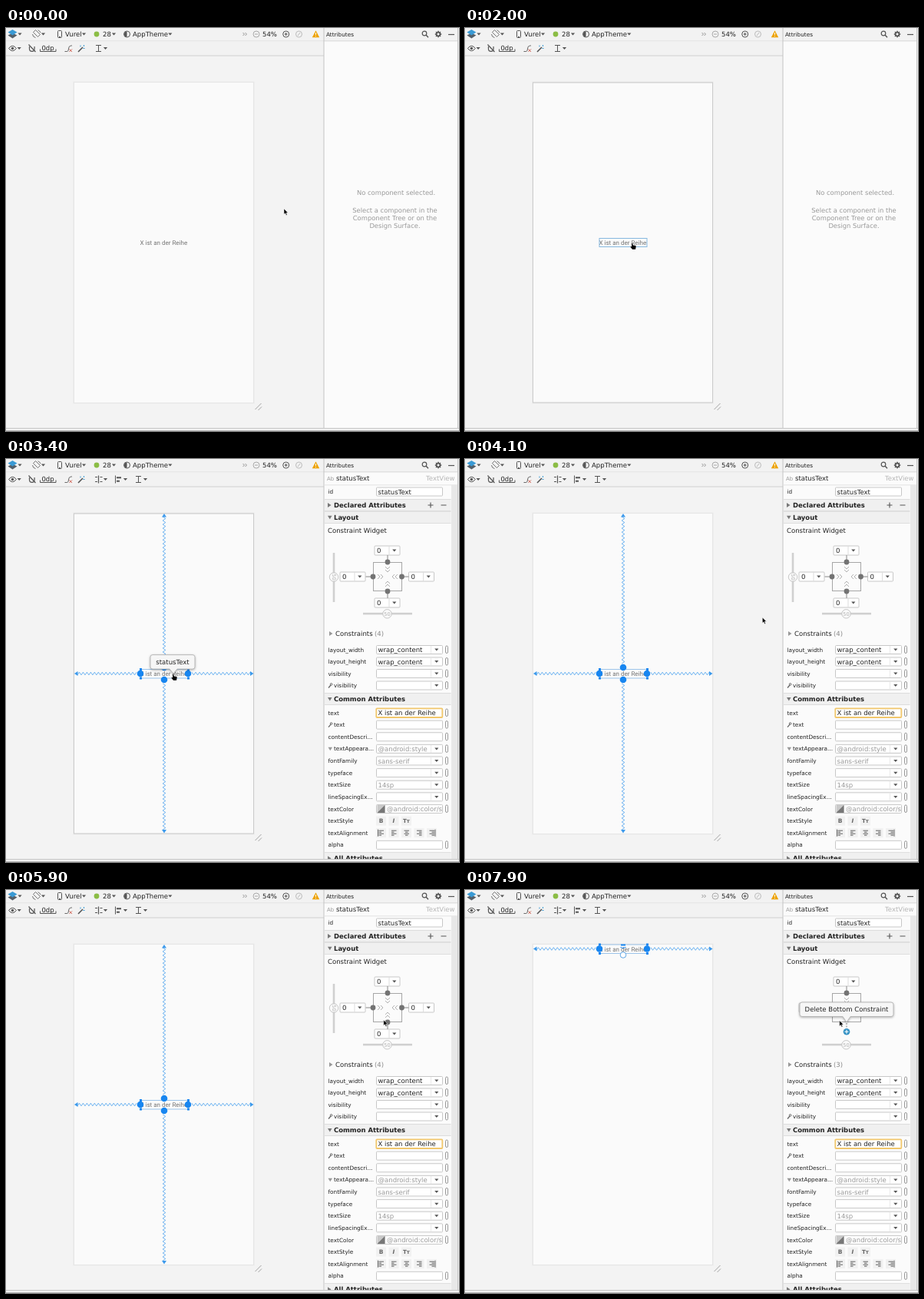
An HTML page for the animation above (8000 ms loop, 590 by 524 pixels).

```html
<!DOCTYPE html>
<html lang="en">
<head>
<meta charset="utf-8">
<title>Layout editor</title>
<style>
html, body { margin: 0; width: 590px; height: 524px; overflow: hidden; background: #f3f3f3; }
svg { display: block; font-family: "DejaVu Sans", sans-serif; text-rendering: geometricPrecision; }
text { white-space: pre; }
.bubble { filter: drop-shadow(0 1px 1.5px rgba(0, 0, 0, .3)); }
</style>
</head>
<body>
<svg id="stage" width="590" height="524" viewBox="0 0 590 524"></svg>
<script>
const BLUE = '#1886f0', INK = '#222', GREY = '#999', EDGE = '#c8c8c8';
const SIZE = 8.53, SMALL = 7.3;

// Drawing helpers: each returns SVG markup.
const rect = (x, y, w, h, fill, stroke, r = 0) => stroke
  ? `<rect x="${x + .5}" y="${y + .5}" width="${w - 1}" height="${h - 1}" rx="${r}" fill="${fill}" stroke="${stroke}"/>`
  : `<rect x="${x}" y="${y}" width="${w}" height="${h}" rx="${r}" fill="${fill}"/>`;
const path = (d, stroke = '#555', w = 1, fill = 'none') =>
  `<path d="${d}" stroke="${stroke}" stroke-width="${w}" fill="${fill}"/>`;
const solid = (d, fill = '#555') => path(d, 'none', 0, fill);
const dot = (x, y, r, fill, stroke = 'none', w = 1) =>
  `<circle cx="${x}" cy="${y}" r="${r}" fill="${fill}" stroke="${stroke}" stroke-width="${w}"/>`;
const text = (x, y, s, fill = INK, size = SIZE, more = '') =>
  `<text x="${x}" y="${y + size * .36}" font-size="${size}" fill="${fill}" ${more}>${s}</text>`;
const caret = (x, y, fill = '#555') => solid(`M${x - 2.6} ${y - 1.4}h5.2l-2.6 3z`, fill);
const group = (id, body) => `<g id="${id}">${body}</g>`;
const bold = 'font-weight="bold"';
const mid = 'text-anchor="middle"';

function toolbar() {
  return rect(0, 0, 590, 17, '#f2f2f2') + rect(0, 17, 414, 19, '#f2f2f2') +
    rect(0, 16.5, 414, .7, '#dedede') + rect(0, 35.5, 414, 1, '#d2d2d2') +
    solid('M2.5 9.5L8.5 6.5L14.5 9.5L8.5 13.5z', '#55606a') + solid('M2.5 5.5L8.5 2L14.5 5.5L8.5 9.5z', '#3a9ad4') +
    caret(18, 8) +
    path('M35.500 5.500l3-3l6 6l-3 3zM34.500 8a5 5 0 0 0 4 4.500M41.500 2.800a5 5 0 0 1 3.500 3.500', '#666', .9) + caret(48.5, 8) +
    rect(67, 3, 6, 10, 'none', '#555', 1) + rect(69, 11, 2, 1, '#555') +
    text(77, 8, 'Vurel') + caret(101.5, 8) +
    dot(118, 8, 3.4, '#8bbd45') + text(126, 8, '28') + caret(140.5, 8) +
    dot(157.5, 8, 4, 'none', '#555') + solid('M157.5 4.5a3.5 3.5 0 0 0 0 7z') +
    text(165, 8, 'AppTheme') + caret(213.8, 8) +
    path('M308.500 6l2 2l-2 2M311.500 6l2 2l-2 2', '#888', .9) +
    dot(326, 8, 4, 'none', '#aaa') + path('M324 8h4', '#aaa') +
    text(334, 8, '54%') +
    dot(364.7, 8, 4, 'none', '#555') + path('M362.700 8h4M364.700 6v4') +
    dot(381.5, 8, 4, 'none', '#bbb') + path('M380 10l3-4', '#bbb') +
    solid('M403.500 3.300L408.200 12.200H398.800z', '#eda200') + rect(403, 6, 1, 3, '#fff') + rect(403, 10, 1, 1, '#fff') +
    path('M3.500 26.500q5-6.500 10 0q-5 6.500-10 0z', '#555') + dot(8.5, 26.5, 1.7, '#555') + caret(17.2, 26.5) +
    path('M30.500 24v3a3.300 3.300 0 0 0 6.600 0v-3M29.500 21.500l9 9.500', '#555', 1.2) +
    text(54.5, 25.8, '0dp', INK, SIZE, mid) + path('M44.500 27.500v3h20.500v-3') +
    path('M76.500 30.500h3q2 0 2-3.500t3-4h1.500', '#666') + path('M82.500 27.500l3.500 3.500m0-3.500l-3.500 3.500', '#d06050') +
    path('M94 31l6-6', '#555', 1.6) + path('M97 22.500v2M101.500 22v2M102.500 26.500h-2', '#3a9ad4');
}

const ibeam = x => path(`M${x - 3.5} 22.500h7M${x - 3.5} 30.500h7M${x} 22.500v8`) + caret(x + 9, 26.5);

const alignTools =
  path('M116 23.500h3M116 29.500h3M120.500 21.500v10M122.500 23.500h3M122.500 29.500h3', '#555', 1.2) + caret(129.5, 26.5) +
  path('M142.500 21.500v10', '#555') + path('M144 24.200h6M144 28.800h4', '#555', 2) + caret(155.5, 26.5);

function panelBase() {
  const teeth = [0, 45, 90, 135].map(a =>
    `<path d="M563 3.800v8.400" stroke="#555" stroke-width="1.700" transform="rotate(${a} 563 8)"/>`).join('');
  return rect(414, 17, 175, 503, '#fbfbfb') + rect(414, 16.5, 175, .8, '#d0d0d0') +
    text(417, 8, 'Attributes', INK, SMALL) +
    dot(545, 7, 2.8, 'none', '#555', 1.2) + path('M547 9l3 3.300', '#555', 1.4) +
    teeth + dot(563, 8, 2.3, '#f2f2f2', '#555', 1.6) + path('M576 8.500h8', '#555', 1.2);
}

const emptyPanel = [['No component selected.', 214], ['Select a component in the', 237],
  ['Component Tree or on the', 247], ['Design Surface.', 257]]
  .map(([s, y]) => text(y === 214 ? 508 : 506.5, y, s, GREY, 8.4, mid)).join('');

const field = (y, stroke = EDGE) => rect(482, y - 6, 87, 12, '#fff', stroke, 1);
const combo = y => field(y) + rect(553, y - 5, 1, 10, '#e8e8e8') + caret(560.8, y);
const pill = y => rect(572, y - 5.5, 4, 10.5, '#fdfdfd', '#999', 1.5);
const wrench = y => path(`M420 ${y + 3}l3-3.500`, '#666', 1.3) + dot(423.6, y - 1.6, 1.3, 'none', '#666');
const closed = (x, y, c = '#777') => solid(`M${x} ${y - 3}l4.500 3l-4.500 3z`, c);
const opened = (x, y, c = '#777') => solid(`M${x} ${y - 2}h5.500l-2.700 4.500z`, c);
const header = (y, s, open) => rect(415, y - 7.5, 164.5, 15, '#f0f0f0') + rect(415, y - 8, 164.5, .8, '#d8d8d8') +
  rect(415, y + 7.2, 164.5, .8, '#d8d8d8') + (open ? opened : closed)(419, y) + text(427, y, s, INK, 8.46, bold);

// label, value, kind, mark
const layoutRows = [['layout_width', 'wrap_content', 'c'], ['layout_height', 'wrap_content', 'c'],
  ['visibility', '', 'c'], ['visibility', '', 'c', 'w']];
const commonRows = [['text', 'X ist an der Reihe', 't'], ['text', '', 'f', 'w'], ['contentDescri...', '', 'f'],
  ['textAppeara...', '@android:style', 'c', 'o'], ['fontFamily', 'sans-serif', 'c'], ['typeface', '', 'c'],
  ['textSize', '14sp', 'c'], ['lineSpacingEx...', '', 'c'], ['textColor', '@android:color/s', 'k'],
  ['textStyle', '', 's'], ['textAlignment', '', 'a'], ['alpha', '', 'f']];

function styleButtons(y) {
  return [488.5, 505, 521.5].map(x => rect(x - 6.5, y - 6, 13, 12, '#f1f1f1')).join('') +
    text(488.5, y, 'B', '#666', 7.5, bold + mid) + text(505, y, 'I', '#666', 7.5, bold + mid + ' font-style="italic"') +
    text(521.5, y, 'Tт', '#666', 7, bold + mid);
}

function alignButtons(y) {
  return [488.5, 505, 521.5, 538, 554.5].map((x, i) => {
    const shift = [0, 0, 1.5, 3, 3][i];
    const bars = [-3, -1, 1, 3].map((dy, k) =>
      `M${x - 3 + (k % 2 ? shift : 0)} ${y + dy}h${k % 2 ? 3.5 : 6.5}`).join('');
    const side = i === 0 ? `M${x - 4} ${y - 4.5}v9` : i === 4 ? `M${x + 4.5} ${y - 4.5}v9` : '';
    return rect(x - 6.5, y - 6, 13, 12, '#f1f1f1') + path(bars + side, '#555', .9);
  }).join('');
}

function row([label, value, kind, mark], y, labelY, i) {
  const grey = i >= 0 && kind !== 't';
  let out = text(mark ? 427 : 419.5, labelY, label, INK, SMALL);
  if (mark === 'w') out += wrench(labelY);
  if (mark === 'o') out += opened(419.5, labelY, '#999');
  if (kind === 's') return out + styleButtons(y);
  if (kind === 'a') return out + alignButtons(y);
  out += kind === 'c' ? combo(y) : field(y);
  if (kind === 't') out += `<rect x="482.300" y="${y - 5.7}" width="86" height="11.700" rx="1" fill="#fff" stroke="#f1c76c" stroke-width="1.800"/>`;
  if (kind === 'k') out += rect(483.5, y - 5, 10, 10, '#c9c9c9') + solid(`M493.500 ${y - 5}v10h-10z`, '#777');
  const x = kind === 'k' ? 496 : 484.5;
  const clip = kind === 'c' ? 'clip-path="url(#comboClip)"' : 'clip-path="url(#fieldClip)"';
  return out + text(x, y, value, grey ? GREY : INK, SIZE, clip) + pill(y);
}

// Rows sit slightly differently until the panel has been laid out.
function rows(early) {
  const lift = early ? 3 : 0;
  return text(419.5, early ? 40 : 42.5, 'id', INK, SMALL) +
    layoutRows.map((r, i) => row(r, 248 + i * 15.5, 248 + i * 15.5 - lift, -1)).join('') +
    commonRows.map((r, i) => {
      const y = 330 + i * (early ? 15.77 : 15.62);
      return row(r, y, y - (early ? 3.2 : 0), i);
    }).join('') + header(early ? 521 : 519.3, 'All Attributes', false);
}

const panelTop = text(418, 25, 'Ab', GREY, 7) + text(430, 25, 'statusText') +
  text(584.5, 25, 'TextView', '#b5b5b5', SIZE, 'text-anchor="end"') + rect(415, 33.5, 173, .8, '#dcdcdc') +
  rect(580, 34, 8, 486, '#e8e8e8') +
  field(42.5) + text(484.5, 42.5, 'statusText') +
  header(60, 'Declared Attributes') + path('M549.500 60h7M553 56.500v7M566.500 60h7', '#555', 1.1) +
  header(75.8, 'Layout', true) + text(419, 92.5, 'Constraint Widget') +
  closed(421, 227, '#999') + text(429, 227, 'Constraints') + header(312, 'Common Attributes', true);

const margin = (x, y) => rect(x, y - 6.5, 34, 13, '#fff', EDGE, 1) + rect(x + 19, y - 6, 1, 12, '#ddd') +
  text(x + 3.5, y, '0') + caret(x + 26.3, y);
const knob = (x, y, turn = 0) => dot(x, y, 5.7, '#fbfbfb', '#c4c4c4') +
  text(x, y, '50', '#b0b0b0', 6.6, `${mid} transform="rotate(${turn} ${x} ${y})"`);
const chevrons = turn => `<g transform="rotate(${turn} 497 153)">` +
  path('M484 150l3 3l-3 3M488 150l3 3l-3 3', '#aaa', .9) + '</g>';
const joint = (x, y) => dot(x, y, 3.4, '#737373');

const widget = margin(479.5, 119) + margin(434.5, 153) + margin(524, 153) +
  path('M497 125v9M468.500 153h10M515.500 153h9', '#888') + rect(478, 134, 38, 38, '#fbfbfb', '#a6a6a6') +
  chevrons(0) + chevrons(90) + chevrons(180) + joint(497, 134) + joint(478, 153) + joint(515.5, 153) +
  rect(465, 199.8, 64, 2.6, '#d0d0d0') + knob(496.5, 201.3);
const widgetBottom = margin(479.5, 187) + path('M497 172v9', '#888') + chevrons(270) + joint(497, 172) +
  rect(425.7, 122, 2.6, 64, '#d0d0d0') + knob(427, 153.5, 90);
const widgetOpen = path('M497 166v13', '#888').replace('/>', ' stroke-dasharray="2 1.500"/>') +
  dot(497, 184.3, 4.3, '#3592c4') + path('M494.500 184.300h5M497 181.800v5', '#fff', 1.1);

// A zigzag spring along one axis, ending at `to`.
function spring(from, to, at, upright) {
  const n = Math.round(Math.abs(to - from) / 2.5);
  const pts = Array.from({ length: n + 1 }, (_, i) => {
    const a = (from + (to - from) * i / n).toFixed(2), b = at + (i % 2 ? 1.8 : -1.8);
    return upright ? `${b} ${a}` : `${a} ${b}`;
  });
  return path('M' + pts.join('L'), 'currentColor', .75);
}

function arrow(x, y, turn) {
  return `<path d="M0 0l4.500-3v6z" fill="currentColor" transform="translate(${x} ${y}) rotate(${turn})"/>`;
}

const sideSprings = y => spring(170, 93, y, false) + spring(242, 318, y, false) + arrow(89, y, 0) + arrow(322.5, y, 180);
const phrase = y => text(174.5, y, 'X ist an der Reihe', '#757575', 8, 'font-family="Roboto, sans-serif"');
const handle = (x, y) => dot(x, y, 4.3, BLUE);

function selection(y) {
  const corners = [174, 236].map(x => [y - 7, y + 4.5].map(cy => rect(x, cy, 3, 3, BLUE)).join('')).join('');
  return path(`M175.500 ${y - 5.5}h62M175.500 ${y + 6}h62`, '#84b7e6', .8) + corners +
    handle(175, y) + handle(237, y);
}

function bubble(x, y, w, tipX, tipY, s) {
  const b = y + 18.5;
  const d = `M${x + 3} ${y}H${x + w - 3}q3 0 3 3V${b - 3}q0 3-3 3H${tipX + 5}L${tipX} ${tipY}L${tipX - 5} ${b}H${x + 3}q-3 0-3-3V${y + 3}q0-3 3-3z`;
  return `<g class="bubble">${path(d, '#b4b4b4', .9, '#f6f6f6')}</g>` + text(x + w / 2, y + 9, s, INK, SIZE, mid);
}

const stage = document.getElementById('stage');
stage.innerHTML =
  '<defs><clipPath id="comboClip"><rect x="482" y="0" width="67.500" height="524"/></clipPath>' +
  '<clipPath id="fieldClip"><rect x="482" y="0" width="86" height="524"/></clipPath></defs>' +
  rect(0, 0, 590, 524, '#f3f3f3') + toolbar() + group('plainTools', ibeam(120.5)) +
  group('pickedTools', alignTools + ibeam(172.5)) +
  rect(87, 69.5, 237, 419, '#eee') + rect(88, 70, 235, 418, '#fafafa', '#e6e6e6') +
  group('rim', rect(88, 70.5, 235, 417, '#fafafa', '#cbcbcb')) +
  path('M324.500 496l8-8M328.500 497l4.500-4.500', '#999', .9) +
  group('textMid', phrase(279.3)) + group('hoverBox', rect(174.5, 273, 63, 12, 'none', '#86b8df')) +
  group('springs', group('sides', sideSprings(279)) +
    group('tall', spring(266, 75, 206, true) + spring(292, 482, 206, true) + arrow(206, 486.5, 270)) +
    group('straight', path('M206 266V74', 'currentColor')) + arrow(206, 71, 90)) +
  group('pickMid', selection(279) + handle(206, 271) + group('lowFull', handle(206, 287)) +
    group('lowOpen', dot(206, 287, 3.8, '#fff', '#5fa5e4'))) +
  group('pickTop', phrase(77) + `<g color="#3d9aec">${sideSprings(76.5)}</g>` + selection(76.5) +
    path('M203 71.500h6', BLUE, 2) + path('M202.500 74.500q3.500 2 7 0', BLUE) + dot(206, 84.5, 3.8, '#fff', '#5fa5e4')) +
  panelBase() + group('empty', emptyPanel) +
  group('panel', panelTop + group('early', rows(true)) + group('settled', rows(false)) +
    group('four', text(480, 227, '(4)', '#888')) + group('three', text(480, 227, '(3)', '#888')) +
    widget + group('linked', widgetBottom) + group('unlinked', widgetOpen)) +
  rect(413.5, 0, 1, 520, '#c4c4c4') + rect(588, 0, 1, 520, '#c4c4c4') + rect(589, 0, 1, 524, '#f2f2f2') +
  rect(0, 520, 590, 4, '#f2f2f2') + rect(0, 520, 590, 1, '#c6c6c6') + rect(0, 523, 590, 1, '#b8b8b8') +
  group('nameTip', bubble(188, 254.6, 58, 218, 279, 'statusText')) +
  group('deleteTip', bubble(436, 146, 122, 497, 172, 'Delete Bottom Constraint')) +
  group('cursor', group('pointer', path('M0 0v7.300l1.700-1.500l1.200 2.700l1.300-.6l-1.200-2.600h2.300z', '#fff', .5, '#000')) +
    group('hand', path('M-1.200 0q1-.8 1.700 0l.5 2.300l3 .4q1 .5.9 2l-.8 3.300h-4.200l-2.600-3.300q-.2-1.200 1.700-.7z', '#fff', .4, '#000')));

const el = {};
stage.querySelectorAll('g[id]').forEach(g => el[g.id] = g);
const show = (id, on) => { el[id].style.display = on ? '' : 'none'; };

// time, x, y
const route = [[0, 362, 235], [400, 362, 235], [1000, 297, 258], [1200, 297, 258], [2000, 218, 280], [3400, 218, 280],
  [4100, 387.3, 206], [4400, 387.3, 206], [5300, 483.5, 169.5], [5600, 490.7, 169], [5800, 490.7, 169],
  [5900, 491.8, 169], [6400, 495.5, 171], [7800, 495.5, 171], [7900, 487.7, 169.7], [8000, 487.7, 169.7]];

const ramp = (t, a, b) => Math.min(1, Math.max(0, (t - a) / (b - a)));
const ease = k => (1 - Math.cos(Math.PI * k)) / 2;

function place(t) {
  const i = Math.max(1, route.findIndex(p => t <= p[0]));
  const [a, x, y] = route[i - 1], [b, x2, y2] = route[i];
  const k = ease(ramp(t, a, b));
  return [x + (x2 - x) * k, y + (y2 - y) * k];
}

const mix = (a, b, k) => `rgb(${a.map((v, i) => Math.round(v + (b[i] - v) * k))})`;

function draw(now) {
  const t = Math.floor(now % 8000 / 100) * 100;
  const picked = t >= 2500, panel = t >= 2600, cut = t >= 7000, freed = t >= 7100, moved = t >= 7600;
  const hand = t >= 1900 && t < 3500;
  const [x, y] = place(t);
  el.cursor.setAttribute('transform', `translate(${x.toFixed(2)} ${y.toFixed(2)})`);
  show('hand', hand);
  show('pointer', !hand);
  el.rim.style.opacity = ramp(t, 800, 1500) * (1 - ramp(t, 3700, 4100));
  show('hoverBox', t >= 1900 && !picked);
  el.springs.style.color = mix([150, 182, 222], [61, 154, 236], ramp(t, 2800, 3300));
  show('springs', picked && !moved);
  show('tall', !freed);
  show('straight', freed);
  show('pickMid', picked && !moved);
  show('lowFull', !freed);
  show('lowOpen', freed);
  show('textMid', !moved);
  show('pickTop', moved);
  show('plainTools', !panel);
  show('pickedTools', panel);
  show('empty', !panel);
  show('panel', panel);
  show('early', t < 3000);
  show('settled', t >= 3000);
  show('four', !cut);
  show('three', cut);
  show('linked', !cut);
  show('unlinked', cut);
  show('nameTip', t >= 3400 && t < 3700);
  show('deleteTip', t >= 6800);
}

const start = performance.now();
function tick() {
  draw(performance.now() - start);
  requestAnimationFrame(tick);
}
tick();
</script>
</body>
</html>
```
